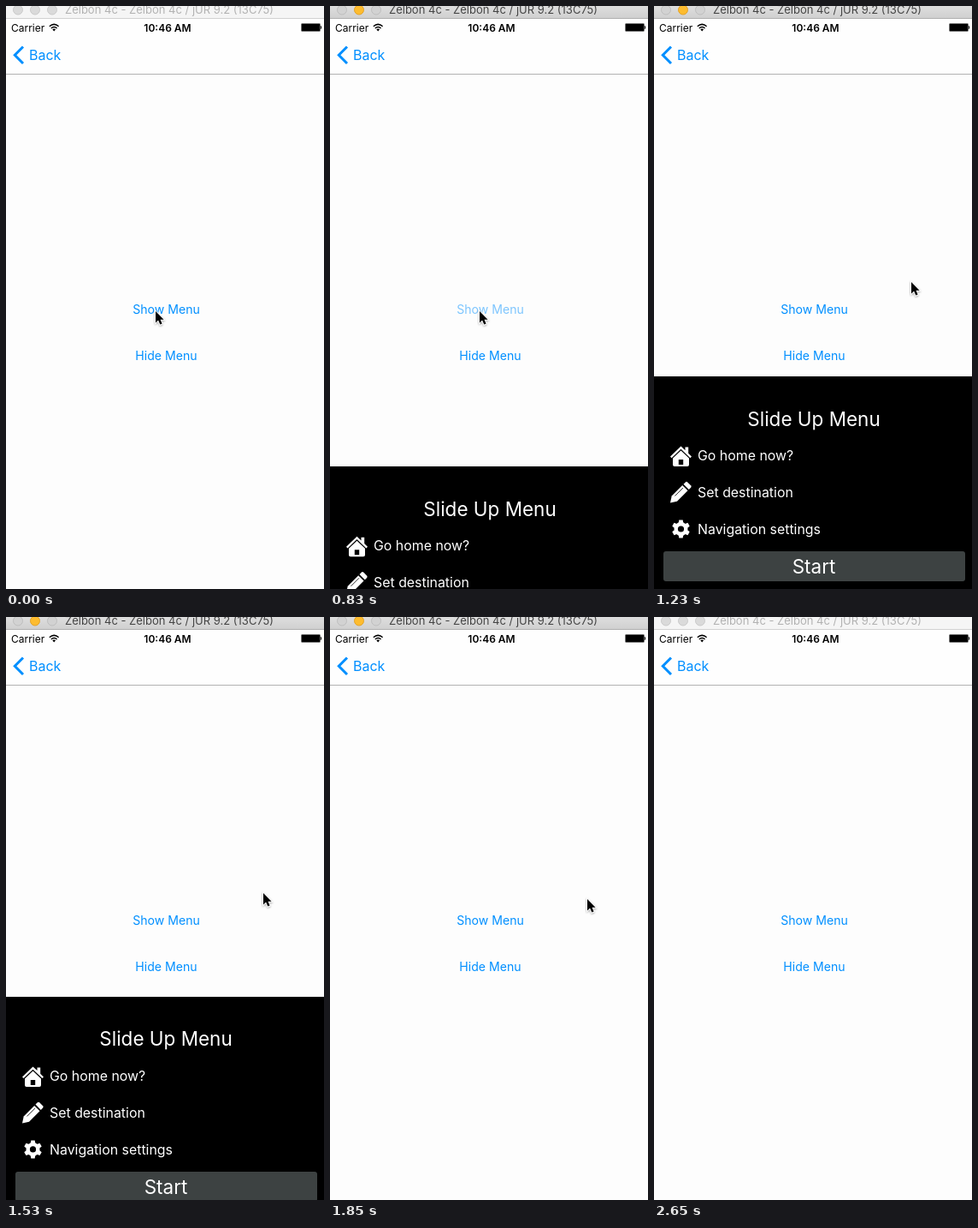
Recreate the animation shown at these times as an HTML page. Size 372 by 680 pixels, loop 2.69 s.

```html
<!DOCTYPE html>
<html lang="en">
<head>
<meta charset="utf-8">
<title>Slide Up Menu</title>
<style>
  html, body { margin: 0; width: 100%; height: 100%; overflow: hidden; background: #fdfdfd; }
  svg { display: block; width: 372px; height: 680px; font-family: Inter, "Open Sans", sans-serif; }
  .middle { text-anchor: middle; }
  .link { fill: #008fff; font-size: 14.1px; }
  .head { font-size: 22.5px; }
  .row { font-size: 15.9px; }
  .bar text { font-size: 13px; }

  .active, .show, .menu, .pointer, .shape { animation: 2690ms linear infinite; }
  .active { animation-name: focus; animation-timing-function: step-end; }
  .show { animation-name: press; }
  .menu { animation-name: slide; }
  .pointer { animation-name: travel; }
  .shape { animation-name: blink; animation-timing-function: step-end; }

  @keyframes focus {
    0%, 98.51%, 100% { opacity: 0; }
    24.16% { opacity: 1; }
  }
  @keyframes press {
    0% { opacity: 1; animation-timing-function: step-end; }
    24.16%, 26.39% { opacity: .2; }
    37.92%, 100% { opacity: 1; }
  }
  @keyframes slide {
    0% { transform: translateY(680px); }
    25.8% { transform: translateY(680px); animation-timing-function: ease-in-out; }
    35.09% { transform: translateY(432px); }
    55.5% { transform: translateY(432px); animation-timing-function: ease-in-out; }
    64.8%, 100% { transform: translateY(680px); }
  }
  @keyframes travel {
    0% { transform: translate(175px, 356px); }
    35.13% { transform: translate(175px, 356px); animation-timing-function: ease-in-out; }
    43.49% { transform: translate(301px, 323px); }
    45.72%, 64.68% { transform: translate(301px, 322px); }
    68.77% { transform: translate(301px, 329px); animation-timing-function: cubic-bezier(.4, 0, .8, .6); }
    75.46% { transform: translate(370px, 650px); animation-timing-function: step-end; }
    84.01% { transform: translate(351px, 666px); }
    85.5%, 100% { transform: translate(347px, 672px); }
  }
  @keyframes blink {
    0%, 84.01% { opacity: 1; }
    77.69%, 86.98%, 100% { opacity: 0; }
  }
</style>
</head>
<body>
<svg viewBox="0 0 372 680">
  <defs>
    <linearGradient id="chrome" x2="0" y2="1">
      <stop stop-color="#dedede"/>
      <stop offset="1" stop-color="#d0d0d0"/>
    </linearGradient>
    <filter id="shadow" x="-50%" y="-50%" width="200%" height="200%">
      <feDropShadow dx="0" dy="1" stdDeviation=".8" flood-opacity=".4"/>
    </filter>
  </defs>

  <rect width="372" height="680" fill="#fdfdfd"/>
  <rect y="15" width="372" height="64" fill="#fefefe"/>
  <rect y="79" width="372" height="1" fill="#b2b2b2"/>

  <g class="bar">
    <rect width="372" height="14" fill="#f5f5f5"/>
    <rect y="14" width="372" height="1" fill="#d2d2d2"/>
    <g fill="#dadada" stroke="#cbcbcb">
      <circle cx="14" cy="4.5" r="5.5"/>
      <circle cx="34" cy="4.5" r="5.5"/>
      <circle cx="54" cy="4.5" r="5.5"/>
    </g>
    <text x="69" y="9" fill="#b2b2b2">Zelbon 4c - Zelbon 4c / jUR 9.2 (13C75)</text>
  </g>
  <g class="bar active">
    <rect width="372" height="14" fill="url(#chrome)"/>
    <rect y="14" width="372" height="1" fill="#b0b0b0"/>
    <g fill="#d2d2d2" stroke="#bebebe">
      <circle cx="14" cy="4.5" r="5.5"/>
      <circle cx="34" cy="4.5" r="5.5" fill="#fdbc2f" stroke="#e2a32b"/>
      <circle cx="54" cy="4.5" r="5.5"/>
    </g>
    <text x="69" y="9" fill="#444">Zelbon 4c - Zelbon 4c / jUR 9.2 (13C75)</text>
  </g>

  <g font-size="12">
    <text x="6" y="29.5">Carrier</text>
    <text class="middle" x="189" y="29.5" font-weight="600">10:46 AM</text>
  </g>
  <g fill="none" stroke="#000" stroke-width="1.5">
    <path d="M50.8 23.8Q56.2 19 61.6 23.8M52.8 26Q56.2 23 59.6 26"/>
    <path d="M54.3 27.2Q56.2 25.8 58.1 27.2L56.2 29.4Z" fill="#000" stroke="none"/>
  </g>
  <rect x="345.5" y="20.5" width="22" height="9" rx="1" fill="#000" stroke="#777"/>
  <path d="M368.3 23.3q1.5 1.7 0 3.4z" stroke="#000" stroke-width=".6"/>

  <path d="M20 47.5L10.3 57.2L20 67" fill="none" stroke="#008fff" stroke-width="3"/>
  <text x="27" y="63" fill="#008fff" font-size="16">Back</text>
  <text class="link middle show" x="187.5" y="358.5">Show Menu</text>
  <text class="link middle" x="187.5" y="412.5">Hide Menu</text>

  <g class="menu" fill="#fff">
    <rect width="372" height="250" fill="#000"/>
    <text class="head middle" x="187" y="57.5">Slide Up Menu</text>

    <path d="M19 93.5L31.5 81.5L36.5 86.2V82.5H40.2V89.8L44 93.5L42.4 95.2L31.5 84.8L20.6 95.2Z"/>
    <path fill-rule="evenodd" d="M22 95.6L31.5 86.6L41 95.6V103Q41 105 39 105H24Q22 105 22 103ZM28.8 97V103H34.2V97Z"/>
    <text class="row" x="51" y="98">Go home now?</text>

    <path d="M19 147.5L20.7 139.5L33.2 127L39.5 133.3L27 145.8Z"/>
    <path d="M34.5 125.7L36.8 123.4Q38 122.3 39.2 123.4L43.1 127.3Q44.2 128.5 43.1 129.7L40.8 132Z"/>
    <path d="M24.5 139.5L34 130" stroke="#000" stroke-width=".8"/>
    <text class="row" x="51" y="141">Set destination</text>

    <g transform="translate(31.5 178)">
      <g id="teeth">
        <path id="tooth" d="M-3 -6L-2.2 -10.5H2.2L3 -6V6L2.2 10.5H-2.2L-3 6Z"/>
        <use href="#tooth" transform="rotate(60)"/>
        <use href="#tooth" transform="rotate(120)"/>
      </g>
      <circle r="8"/>
      <circle r="3.6" fill="#000"/>
    </g>
    <text class="row" x="51" y="184">Navigation settings</text>

    <rect x="11" y="204" width="353" height="35" rx="3" fill="#3d4242"/>
    <text class="head middle" x="187" y="230">Start</text>
  </g>

  <g class="pointer">
    <path class="shape" filter="url(#shadow)" stroke="#fff" stroke-width="1.6" paint-order="stroke"
      d="M0 0V13.4L3.1 10.5L5.3 15.6L7.6 14.6L5.5 9.7H9.6Z"/>
  </g>
</svg>
<script>
  const ticks = [0, 650, 710, 770, 830, 880, 940, 1000, 1060, 1110, 1170, 1230,
    1530, 1580, 1630, 1690, 1740, 1800, 1850, 1910, 1970, 2030, 2090,
    2260, 2300, 2340, 2650];
  const loop = 2690;
  const animations = document.getAnimations();
  const start = performance.now();
  animations.forEach(a => a.pause());

  function draw() {
    const now = (performance.now() - start) % loop;
    const tick = ticks.findLast(t => t <= now);
    animations.forEach(a => { a.currentTime = tick; });
    requestAnimationFrame(draw);
  }
  draw();
</script>
</body>
</html>
```
